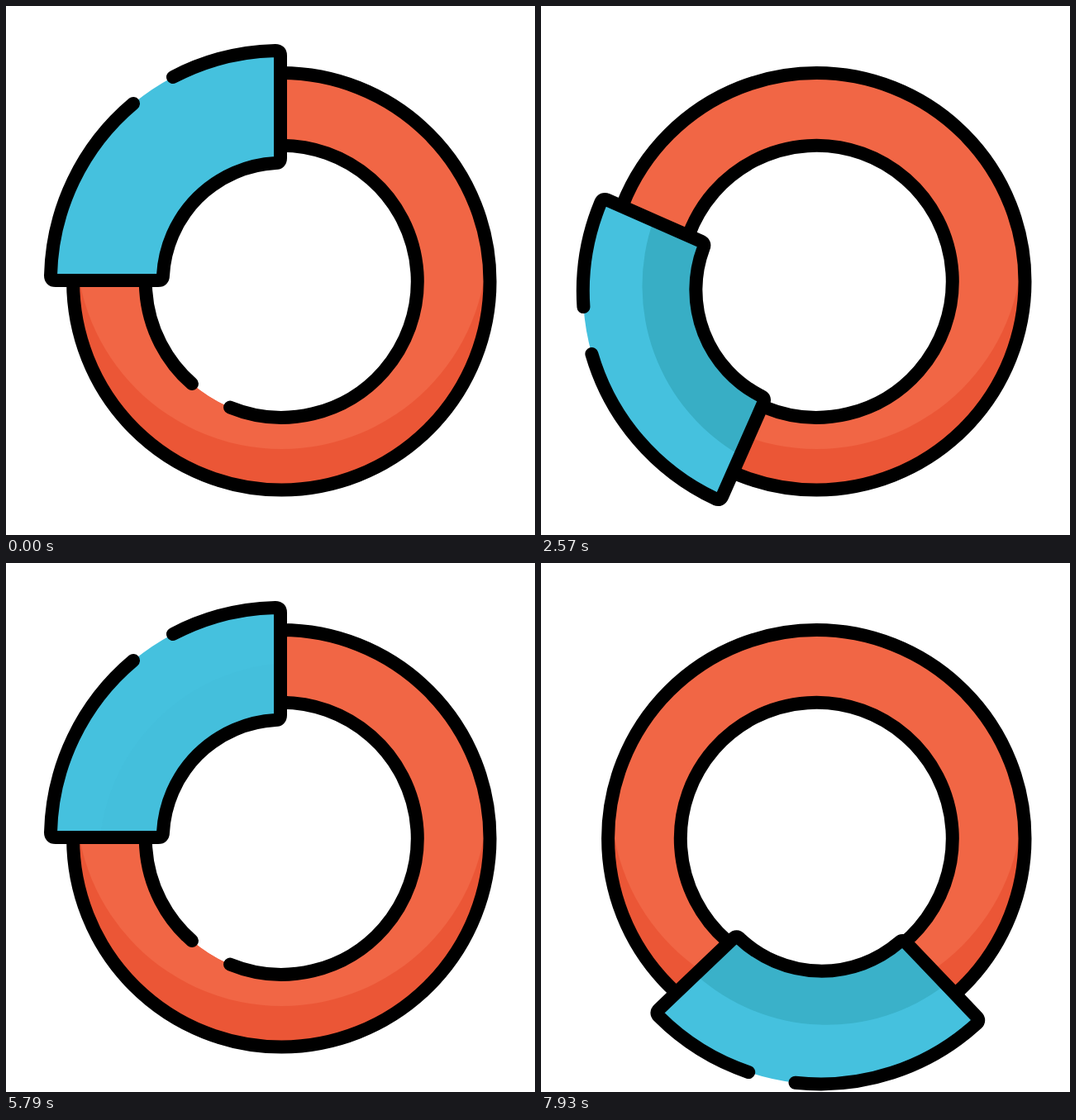
Animation, 640 px wide and 640 px high, one loop 8000 ms. Source, as an HTML page:

```html
<!DOCTYPE html>
<html lang="en">
<head>
<meta charset="utf-8">
<title>Ring chart</title>
<style>
  html, body { margin: 0; height: 100%; overflow: hidden; background: #fff; }
  svg { display: block; width: 100%; height: 100%; }
  .line { fill: none; stroke: #000; stroke-width: 16; stroke-linecap: round; stroke-linejoin: round; }
  .band { fill: none; stroke-width: 87.5; }
</style>
</head>
<body>
<svg viewBox="0 0 640 640">
  <clipPath id="lit"><circle cx="333.5" cy="287.3" r="248.7"/></clipPath>

  <circle class="band" cx="333.3" cy="333.3" r="208.25" stroke="#eb5636"/>
  <g clip-path="url(#lit)">
    <circle class="band" cx="333.3" cy="333.3" r="208.25" stroke="#f16645"/>
  </g>
  <circle class="line" cx="333.3" cy="333.3" r="252.2"/>
  <circle class="line" cx="333.3" cy="333.3" r="164.5" pathLength="360"
    stroke-dasharray="341 19" transform="rotate(131.2 333.3 333.3)"/>

  <g id="slice">
    <path id="body" fill="#45c1de"/>
    <path id="shade" fill="#38aec5" d="M332 121.2A237 237 0 0 0 114 332H184Q190 332 190 326A144 144 0 0 1 326 190Q332 190 332 184Z"/>
    <path id="edge" class="line"/>
  </g>
</svg>
<script>
const $ = id => document.getElementById(id);

const outline = 'M202 86A280 280 0 0 1 326 54Q332 54 332 60V184Q332 190 326 190' +
  'A144 144 0 0 0 190 326Q190 332 184 332H60Q54 332 54 326A280 280 0 0 1 154 118';
$('edge').setAttribute('d', outline);
$('body').setAttribute('d', outline + 'A280 280 0 0 1 202 86Z');

const LOOP = 8000, CYCLE = 6000;

// Progress from 0 to 1 between two times
const span = (t, from, to) => Math.min(1, Math.max(0, (t - from) / (to - from)));
const swing = u => u + u * u - u ** 3;
const settle = u => 1 - (1 - u) ** 3.7;

function draw(now) {
  const t = now % LOOP % CYCLE;
  const angle = 231.5 * swing(span(t, 1160, 2025)) + 128.5 * settle(span(t, 2000, 5480));
  const leave = span(t, 4570, 5210);
  const push = -15 * Math.sin(Math.PI * leave) ** 2;
  const shade = Math.sqrt(span(t, 1160, 2360)) * (1 - .93 * leave);

  $('slice').setAttribute('transform',
    `translate(${push} ${push}) rotate(${angle} 340 340.5)`);
  $('shade').setAttribute('opacity', shade);
}

const start = performance.now();
function tick() {
  draw(performance.now() - start);
  requestAnimationFrame(tick);
}
tick();
</script>
</body>
</html>
```
